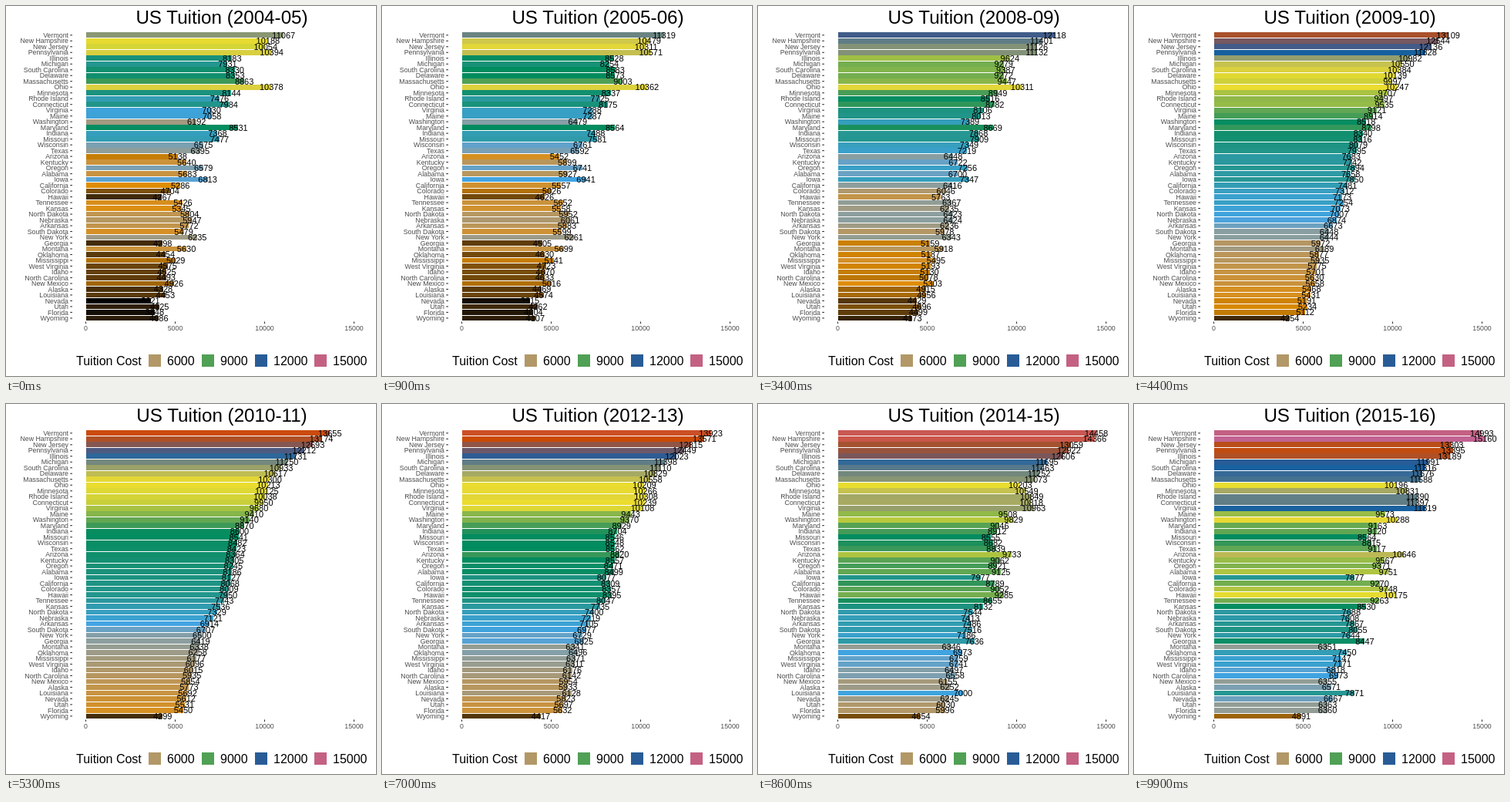
Animation of 480x480 px, one loop 10 s. Source, as an HTML page:

```html
<!DOCTYPE html>
<html lang="en">
<head>
<meta charset="utf-8">
<title>US Tuition</title>
<style>
  html, body { margin: 0; width: 100%; height: 100%; overflow: hidden; background: #fff; }
  svg { display: block; width: 480px; height: 480px; font-family: "Liberation Sans", Arial, sans-serif; }
  rect { shape-rendering: crispEdges; }
  .axis { font-size: 8.8px; fill: #4d4d4d; }
  .tick { stroke: #333; stroke-width: 1.07; }
  .value { font-size: 11px; text-anchor: middle; }
  .title { font-size: 24.2px; text-anchor: middle; }
  .legend { font-size: 16px; }
</style>
</head>
<body>
<svg viewBox="0 0 480 480">
  <filter id="darken" color-interpolation-filters="sRGB">
    <feComponentTransfer>
      <feFuncR type="gamma" exponent="1.25"/>
      <feFuncG type="gamma" exponent="1.25"/>
      <feFuncB type="gamma" exponent="1.25"/>
    </feComponentTransfer>
  </filter>
  <g id="fills" filter="url(#darken)"></g>
  <g id="marks"></g>
</svg>
<script>
const fills = document.getElementById('fills'), marks = document.getElementById('marks');
const ORIGIN = 103.5, SCALE = 0.0232, TOP = 37.8, PITCH = 7.492, BAR = 6.74;
const LOW = 3621, HIGH = 15190, MID_YEAR = 6, LAST_YEAR = 11;
const palette = ['#000000', '#e69f00', '#56b4e9', '#009e73', '#f0e442', '#0072b2', '#d55e00', '#cc79a7'];

// Tuition in the first and last year, highest average first.
const tuition = {
  'Vermont': [11067, 14993], 'New Hampshire': [10188, 15160], 'New Jersey': [10054, 13303],
  'Pennsylvania': [10394, 13395], 'Illinois': [8183, 13189], 'Michigan': [7931, 11991],
  'South Carolina': [8330, 11816], 'Delaware': [8353, 11676], 'Massachusetts': [8863, 11588],
  'Ohio': [10378, 10196], 'Minnesota': [8144, 10831], 'Rhode Island': [7476, 11390],
  'Connecticut': [7984, 11397], 'Virginia': [7030, 11819], 'Maine': [7058, 9573],
  'Washington': [6192, 10288], 'Maryland': [8531, 9163], 'Indiana': [7368, 9120],
  'Missouri': [7477, 8564], 'Wisconsin': [6575, 8815], 'Texas': [6395, 9117],
  'Arizona': [5138, 10646], 'Kentucky': [5640, 9567], 'Oregon': [6579, 9371],
  'Alabama': [5683, 9751], 'Iowa': [6813, 7877], 'California': [5286, 9270],
  'Colorado': [4704, 9748], 'Hawaii': [4267, 10175], 'Tennessee': [5426, 9263],
  'Kansas': [5345, 8530], 'North Dakota': [5804, 7688], 'Nebraska': [5947, 7608],
  'Arkansas': [5772, 7867], 'South Dakota': [5479, 8055], 'New York': [6235, 7644],
  'Georgia': [4298, 8447], 'Montana': [5630, 6351], 'Oklahoma': [4454, 7450],
  'Mississippi': [5029, 7147], 'West Virginia': [4575, 7171], 'Idaho': [4525, 6818],
  'North Carolina': [4493, 6973], 'New Mexico': [4926, 6355], 'Alaska': [4328, 6571],
  'Louisiana': [4453, 7871], 'Nevada': [3621, 6667], 'Utah': [4125, 6363],
  'Florida': [3848, 6360], 'Wyoming': [4086, 4891],
};

// In the middle year tuition falls smoothly with rank: [rank, tuition].
const midCurve = [[0, 13655], [5, 11250], [8, 10300], [12, 9950], [17, 8600], [28, 7950], [35, 6500], [48, 5450], [49, 4299]];

const mix = (a, b, share) => a + (b - a) * share;
const toX = value => ORIGIN + value * SCALE;

function midValue(rank) {
  const i = Math.max(midCurve.findIndex(([r]) => r >= rank), 1);
  const [r0, v0] = midCurve[i - 1], [r1, v1] = midCurve[i];
  return mix(v0, v1, (rank - r0) / (r1 - r0));
}

// Growth speeds up until the middle year, then stays even.
function valueAt({ first, mid, last }, year) {
  return Math.round(year < MID_YEAR
    ? mix(first, mid, (year / MID_YEAR) ** 1.3)
    : mix(mid, last, (year - MID_YEAR) / (LAST_YEAR - MID_YEAR)));
}

function colour(value) {
  const pos = Math.min(Math.max((value - LOW) / (HIGH - LOW), 0), 1) * (palette.length - 1);
  const i = Math.min(Math.floor(pos), palette.length - 2);
  return `color-mix(in lab, ${palette[i + 1]} ${(pos - i) * 100}%, ${palette[i]})`;
}

function add(parent, tag, attrs, text = '') {
  const el = document.createElementNS('http://www.w3.org/2000/svg', tag);
  for (const name in attrs) el.setAttribute(name, attrs[name]);
  el.textContent = text;
  return parent.appendChild(el);
}

const title = add(marks, 'text', { class: 'title', x: 280, y: 23 });

const states = Object.entries(tuition).map(([name, [first, last]], rank) => {
  const y = TOP + PITCH * rank;
  add(marks, 'text', { class: 'axis', x: 81, y: y + 3.1, 'text-anchor': 'end' }, name);
  add(marks, 'line', { class: 'tick', x1: 83.2, x2: 86, y1: y, y2: y });
  return {
    first, mid: midValue(rank), last,
    bar: add(fills, 'rect', { x: ORIGIN, y: y - BAR / 2, height: BAR }),
    label: add(marks, 'text', { class: 'value', y: y + 4 }),
  };
});

for (const value of [0, 5000, 10000, 15000]) {
  const x = toX(value);
  add(marks, 'line', { class: 'tick', x1: x, x2: x, y1: 409.4, y2: 412.1 });
  add(marks, 'text', { class: 'axis', x, y: 420.8, 'text-anchor': 'middle' }, value);
}

add(marks, 'text', { class: 'legend', x: 91, y: 466 }, 'Tuition Cost');
[185, 254, 323, 400].forEach((x, i) => {
  const value = 6000 + 3000 * i;
  add(fills, 'rect', { x, y: 452, width: 16, height: 16 }).style.fill = colour(value);
  add(marks, 'text', { class: 'legend', x: x + 24, y: 466 }, value);
});

function showTitle(year) {
  title.textContent = `US Tuition (${2004 + year}-${String(5 + year).padStart(2, '0')})`;
}

function showBars(year) {
  for (const state of states) {
    const value = valueAt(state, year);
    state.bar.setAttribute('width', value * SCALE);
    state.bar.style.fill = colour(value);
    state.label.setAttribute('x', toX(value));
    state.label.textContent = value;
  }
}

// Nine steps per year: the title turns halfway, the bars jump on the last step.
let titleYear, barYear;
function draw() {
  const step = Math.floor(performance.now() / 100) % 100;
  const nextTitle = Math.round(step / 9), nextBars = Math.floor((step + 1) / 9);
  if (nextTitle !== titleYear) showTitle(titleYear = nextTitle);
  if (nextBars !== barYear) showBars(barYear = nextBars);
  requestAnimationFrame(draw);
}
draw();
</script>
</body>
</html>
```
